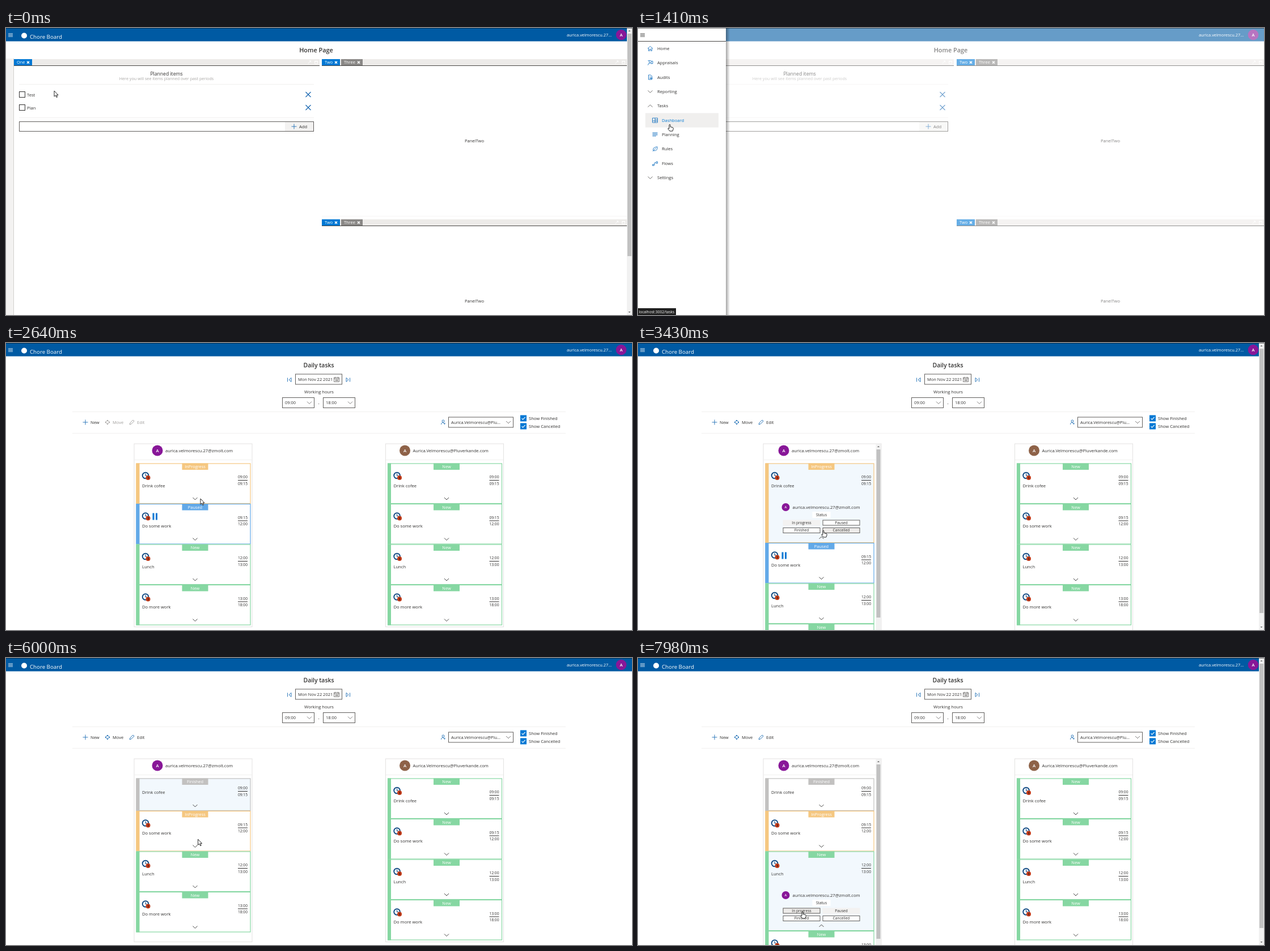
Recreate the animation shown at these times as an HTML page with a canvas. Size 1104x507 px, loop 8000 ms.

```html
<!DOCTYPE html>
<html lang="en">
<head>
<meta charset="utf-8">
<title>Daily tasks</title>
<style>
html, body { margin: 0; width: 100%; height: 100%; overflow: hidden; background: #fff; }
canvas { display: block; }
</style>
</head>
<body>
<canvas id="stage" width="1104" height="507"></canvas>
<script>
const W = 1104, H = 507, LOOP = 8000;
const g = document.getElementById('stage').getContext('2d');
const INK = '#323130', BLUE = '#0078d4', FAINT = '#f1f0ef', PURPLE = '#881798';
const USER = 'aurica.velmorescu.27', MAIL = USER + '@zmolt.com';
const WORK_MAIL = 'Aurica.Velmorescu@Pluverkande.com';
const STATUS_COLOR = { New: '#86d7a2', InProgress: '#f5c780', Paused: '#62a9e8', Finished: '#c2c1c0' };
const TASKS = [
  ['Drink cofee', '09:00', '09:15'],
  ['Do some work', '09:15', '12:00'],
  ['Lunch', '12:00', '13:00'],
  ['Do more work', '13:00', '18:00']
];
const ICONS = {
  home: 'M-4.5 0L0-4L4.5 0M-3-1V4H-1V1H1V4H3V-1',
  people: 'M-4 4Q-3.500 0 0 0Q2 0 3 2M-2-2a2 2 0 1 0 4 0a2 2 0 1 0-4 0M-4-4H-1M2-3H4.500V1H2',
  doc: 'M-3-4H1L3-2V4H-3ZM-1-1H1M-1 1H4M-1 2.500H4',
  down: 'M-4-2L0 2L4-2',
  up: 'M-4 2L0-2L4 2',
  grid: 'M-4.500-4H4.500V4H-4.500ZM0-4V4M-4.500 1H0M0-1H4.500M0 1.500H4.500',
  lines: 'M-4.500-3.500H4.500M-4.500-1.500H4.500M-4.500.500H4.500M-4.500 2.500H2',
  leaf: 'M-4 4L2-2M-3 3Q-5-3 4-4Q5 4-3 3',
  flow: 'M-4.500 4V2H-2V4ZM-2 3H-1V-1H2M2-3H4.500V0H2Z',
  plus: 'M-4.500 0H4.500M0-4.500V4.500',
  cross: 'M-4.500-4.500L4.500 4.500M4.500-4.500L-4.500 4.500',
  tabCross: 'M-2-2L2 2M2-2L-2 2',
  move: 'M-1.500-2.500L0-4L1.500-2.500ZM-1.500 2.500L0 4L1.500 2.500ZM-2.500-1.500L-4-0L-2.500 1.500ZM2.500-1.500L4 0L2.500 1.500Z',
  edit: 'M-4 4L-3 1L2-4L4-2L-1 3Z',
  first: 'M-3.500-3.500V3.500M3-3.500L-1 0L3 3.500Z',
  last: 'M3.500-3.500V3.500M-3-3.500L1 0L-3 3.500Z',
  calendar: 'M-4.500-3.500H4.500V4H-4.500ZM-4.500-1.500H4.500M-2.500.500H3M-2.500 2H3M-2.500-4.500V-3M2.500-4.500V-3',
  person: 'M-3.500 4Q-3 0 0 0.500L3 4M-2-2a2 2 0 1 0 4 0a2 2 0 1 0-4 0M1 2H4',
  check: 'M-3 0L-1 2.200L3.300-2.200',
  burger: 'M-4-2.500H4M-4 0H4M-4 2.500H4',
  expand: 'M-2.500 2.500L2.500-2.500H0M2.500-2.500V0',
  maximize: 'M-2.500-2H2.500V2.500H-2.500ZM-2.500-1.500H2.500'
};
const ARROW = new Path2D('M0 0V10L2.400 8L4 11.500L5.600 10.900L4.100 7.400H7Z');
const HAND = new Path2D('M-1 1Q0-1 1 1V4.500L5 5.500Q6.500 6 6.300 8L5 12H0L-3.200 8Q-3-6-1 7.500Z'.replace('-3-6', '-3 6'));

// time, x, y of the pointer tip
const POINTER = [
  [0, 85, 111], [110, 85, 111], [640, 9, 10], [1060, 9, 10], [1270, 42, 140], [1410, 56, 170],
  [1550, 57, 186], [1690, 57, 186], [2080, 277, 258], [2150, 277, 258], [2570, 343, 275],
  [2640, 343, 275], [2790, 335, 273], [3280, 335, 273], [3430, 327, 331], [3500, 320, 331],
  [3700, 320, 331], [3800, 302, 331], [4600, 303, 331], [4720, 321, 303], [4980, 335, 268],
  [5200, 336, 268], [5390, 338, 317], [5620, 338, 317], [5800, 344, 306], [6210, 333, 335],
  [6390, 333, 335], [6820, 330, 401], [7240, 330, 401], [7960, 290, 448], [LOOP, 290, 448]
];
const HAND_SPANS = [[600, 1060], [1340, 1720], [3390, 4100], [7860, LOOP]];

const ramp = (t, from, to) => Math.min(1, Math.max(0, (t - from) / (to - from)));
const easeOut = p => 1 - (1 - p) ** 3;

function text(s, x, y, { size = 7.6, color = INK, align = 'left', weight = 400 } = {}) {
  g.font = `${weight} ${size}px "Open Sans", "Noto Sans", sans-serif`;
  g.textAlign = align;
  g.fillStyle = color;
  g.fillText(s, x, y + size * 0.36);
}
function rect(x, y, w, h, color) {
  g.fillStyle = color;
  g.fillRect(x, y, w, h);
}
function frame(x, y, w, h, color = '#605e5c', fill = '#fff', width = 1) {
  rect(x, y, w, h, fill);
  g.strokeStyle = color;
  g.lineWidth = width;
  g.strokeRect(x + 0.5, y + 0.5, w - 1, h - 1);
}
function icon(name, x, y, color = '#1f6fb5', width = 0.9) {
  g.save();
  g.translate(x, y);
  g.strokeStyle = color;
  g.lineWidth = width;
  g.stroke(new Path2D(ICONS[name]));
  g.restore();
}
function disc(x, y, r, color) {
  g.fillStyle = color;
  g.beginPath();
  g.arc(x, y, r, 0, 7);
  g.fill();
}
function avatar(x, y, r, color) {
  disc(x, y, r, color);
  text('A', x, y, { size: r * 0.82, color: '#fff', align: 'center', weight: 600 });
}
function scrollbar(x, top, bottom, thumbEnd, w = 9) {
  rect(x, top, w, bottom - top, '#f1f1f1');
  rect(x + 1, top + 10, w - 2, thumbEnd - top - 10, '#c1c1c1');
  const arrow = (y, d) => {
    g.fillStyle = '#606060';
    g.beginPath();
    g.moveTo(x + w / 2 - 2, y + d);
    g.lineTo(x + w / 2 + 2, y + d);
    g.lineTo(x + w / 2, y - d);
    g.fill();
  };
  arrow(top + 5, 1);
  arrow(bottom - 5, -1);
}

function header() {
  rect(0, 0, W, 23.5, '#005aa3');
  icon('burger', 8, 12.5, '#fff');
  disc(32, 13.5, 5, '#fff');
  text('Chore Board', 42, 16, { size: 9.7, color: '#fff' });
  text(USER + '...', 989, 12.5, { size: 7.4, color: '#fff' });
  avatar(1085, 12, 9.3, PURPLE);
}

function tab(label, x, y, w, color) {
  rect(x, y, w, 11, color);
  text(label, x + 5, y + 5.7, { size: 7.4, color: '#fff' });
  icon('tabCross', x + w - 7, y + 5.7, '#fff', 1.5);
}
function tabStrip(x, y, w) {
  rect(x, y, w, 11.5, '#edebe9');
  rect(x, y + 11, w, 1, '#484644');
  icon('expand', x + w - 18, y + 5.5, '#fff');
  icon('maximize', x + w - 6, y + 5.5, '#fff');
}
function home(w) {
  const mid = w / 2, leftEnd = Math.round(mid + 5), rightX = Math.floor(mid + 10), inner = leftEnd - 10;
  const center = (13 + leftEnd) / 2;
  text('Home Page', mid - 0.5, 39, { size: 10.9, align: 'center', weight: 600 });
  rect(0, 54, 13, H, '#f3f2f1');
  rect(13, 54, 1, H, '#d2d0ce');
  tabStrip(14, 55, leftEnd - 14);
  tab('One', 14, 55, 32, BLUE);
  text('Planned items', center, 81, { size: 8.6, align: 'center' });
  text('Here you will see items planned over past periods', center, 89.5, { size: 7.2, color: '#a9a7a5', align: 'center' });
  [99, 158].forEach(y => rect(23, y, inner - 23, 1, FAINT));
  ['Test', 'Plan'].forEach((name, i) => {
    const y = 117.5 + i * 23;
    frame(23, y - 5.5, 11, 11, '#323130');
    text(name, 37, y + 0.3);
    icon('cross', inner - 10, y, '#1262ae', 1.1);
  });
  frame(23, 165, inner - 23, 18);
  rect(inner - 51, 166, 50, 16, '#f3f2f1');
  icon('plus', inner - 35, 174);
  text('Add', inner - 26, 174);
  [55, 338].forEach(y => {
    tabStrip(rightX, y, w - rightX);
    tab('Two', rightX, y, 32, BLUE);
    tab('Three', rightX + 34, y, 38, '#8a8886');
    text('PanelTwo', (rightX + w) / 2, y + 144.5, { align: 'center' });
  });
  rect(rightX, 332, w - rightX, 1, '#f6f5f4');
  if (w < W) scrollbar(w, 0, H, 403);
}

function dropdown(label, x, y, w) {
  frame(x, y, w, 19);
  text(label, x + 5, y + 9.8, { size: 7.4 });
  icon('down', x + w - 9, y + 9.5, '#605e5c', 0.8);
}
function toolbar(dx, selected) {
  g.save();
  g.translate(dx, 0);
  text('Daily tasks', 551.5, 39, { size: 10.4, align: 'center', weight: 600 });
  icon('first', 500, 65);
  icon('last', 603, 65);
  frame(510, 54.500, 83, 19);
  text('Mon Nov 22 2021', 515, 64, { size: 7.5 });
  icon('calendar', 583, 64.5, '#605e5c', 0.8);
  text('Working hours', 552, 86.5, { align: 'center' });
  dropdown('09:00', 487, 96, 57);
  text('-', 551.5, 106, { align: 'center' });
  dropdown('18:00', 559, 96, 57);
  [121, 159].forEach(y => rect(117, y, 870, 1, FAINT));
  const ink = selected ? INK : '#a19f9d', tint = selected ? '#1f6fb5' : '#a19f9d';
  icon('plus', 140, 140);
  text('New', 149, 140);
  icon('move', 179, 140, tint);
  text('Move', 188, 140, { color: ink });
  icon('edit', 222, 140, tint);
  text('Edit', 231, 140, { color: ink });
  icon('person', 771, 140);
  dropdown('Aurica.Velmorescu@Plu...', 780, 130.5, 115);
  ['Finished', 'Cancelled'].forEach((name, i) => {
    const y = 133 + i * 14;
    rect(907, y - 5.5, 11, 11, BLUE);
    icon('check', 912.5, y, '#fff', 1.1);
    text('Show ' + name, 922, y);
  });
  g.restore();
}

function statusButton(label, x, y, { hover, disabled }) {
  if (disabled) rect(x - 33, y - 5, 66, 10, '#f3f2f1');
  else frame(x - 33, y - 5, 66, 10, '#605e5c', hover ? '#edebe9' : '#fff');
  text(label, x, y, { size: 6.6, align: 'center' });
}
function details(center, top, extra, disabled, hover) {
  g.save();
  g.beginPath();
  g.rect(center - 95, top + 57, 190, extra);
  g.clip();
  avatar(center - 63, top + 77.5, 7, PURPLE);
  text(MAIL, center - 51, top + 77.5);
  rect(center - 16, top + 85.5, 32, 11, '#fff');
  text('Status', center, top + 91, { size: 6.6, align: 'center' });
  ['In progress', 'Paused', 'Finished', 'Cancelled'].forEach((label, i) =>
    statusButton(label, center + (i % 2 ? 35 : -35), top + 105 + (i > 1 ? 13.5 : 0),
      { hover: label === hover, disabled: label === disabled }));
  g.restore();
}
const cardHeight = task => (task.status === 'Finished' ? 57.5 : 71.5) + task.extra;
function card(task, x, y, w) {
  const { name, start, end, status, extra = 0 } = task;
  const color = STATUS_COLOR[status], h = cardHeight(task), center = x + 3 + w / 2;
  const compact = status === 'Finished', shift = compact ? -7 : 0, right = x + w - 5.5;
  frame(x, y, w, h, color, task.selected ? '#f2f8fd' : '#fff', 1.2);
  rect(x, y, 6, h, color);
  rect(center - 23, y, 46, 11.5, color);
  text(status, center, y + 6, { size: 7.4, color: '#fff', align: 'center' });
  if (!compact) {
    disc(x + 16.500, y + 21.5, 6.3, '#174f87');
    disc(x + 16.500, y + 21.5, 4.3, '#fff');
    rect(x + 16, y + 18, 1, 4, '#174f87');
    rect(x + 16, y + 21, 3, 1, '#174f87');
    disc(x + 21, y + 25.5, 4, '#c23b1a');
    rect(x + 20.500, y + 23.500, 1.500, 4, '#5b2011');
  }
  if (status === 'Paused') [29, 34.5].forEach(dx => rect(x + dx, y + 16.5, 3, 12, BLUE));
  text(name, x + 10.5, y + (compact ? 25 : 39.5));
  text(start, right, y + 24.5 + shift, { size: 6.7, align: 'right' });
  rect(right - 17, y + 29.5 + shift, 17, 1, INK);
  text(end, right, y + 35.8 + shift, { size: 6.7, align: 'right' });
  if (extra) details(center, y, extra, task.disabled, task.hover);
  icon(task.open ? 'up' : 'down', center, y + h - 9, INK, 0.9);
}
function column(x, bottom, tint, mail, avatarX, tasks, cardWidth) {
  frame(x, 177.500, 209, bottom - 177.5, '#e3e2e1');
  avatar(avatarX, 190, 9.5, tint);
  text(mail, avatarX + 14, 190);
  rect(x + 1, 206, 207, 1, FAINT);
  let y = 212.5;
  for (const task of tasks) {
    card(task, x + 4, y, cardWidth);
    y += cardHeight(task);
  }
}

function tasksAt(t) {
  const later = t >= 3930;
  const statuses = later ? ['Finished', 'InProgress', 'New', 'New'] : ['InProgress', 'Paused', 'New', 'New'];
  const growth = [ramp(t, 3160, 3400) - ramp(t, 4020, 4260), 0, ramp(t, 6965, 7245), 0];
  const selected = t < 3160 ? -1 : t < 6950 ? 0 : 2;
  return TASKS.map(([name, start, end], i) => ({
    name, start, end, status: statuses[i], extra: 69 * growth[i], selected: i === selected,
    open: i === 0 ? t >= 3160 && t < 4020 : i === 2 && t >= 6965,
    disabled: i === 0 ? 'In progress' : 'Paused',
    hover: t < 3380 ? '' : t < 3490 ? 'Cancelled' : t < 4300 ? 'Finished' : t > 7840 ? 'In progress' : ''
  }));
}
function planning(t) {
  const loaded = t >= 2150;
  const mine = loaded ? tasksAt(t) : [];
  const theirs = loaded ? TASKS.map(([name, start, end]) => ({ name, start, end, status: 'New', extra: 0 })) : [];
  const end = mine.reduce((y, task) => y + cardHeight(task), 212.5);
  const bottom = Math.min(525, Math.max(502, end + 3));
  const pageScroll = bottom > H, listScroll = end > 522;
  const dx = pageScroll ? -5 : 0;
  toolbar(dx, t >= 3160);
  column(225.5 + dx, bottom, PURPLE, MAIL, 267 + dx - (listScroll ? 5 : 0), mine, listScroll ? 192 : 202);
  if (listScroll) scrollbar(419.5, 178, 525, t < 5000 ? 485 : 496);
  column(669 + dx, Math.max(502, bottom), '#8e6248', WORK_MAIL, 703.5 + dx, theirs, 202);
  if (pageScroll) scrollbar(1095, 0, H, 477);
}

const MENU = [
  ['home', 'Home'], ['people', 'Appraisals'], ['doc', 'Audits'], ['down', 'Reporting'], ['up', 'Tasks'],
  ['grid', 'Dashboard', 1], ['lines', 'Planning', 1], ['leaf', 'Rules', 1], ['flow', 'Flows', 1], ['down', 'Settings']
];
function menu(shown, hovered) {
  rect(0, 0, W, H, `rgba(255,255,255,${0.4 * shown})`);
  g.save();
  g.translate(-160 * (1 - shown), 0);
  const shade = g.createLinearGradient(155, 0, 162, 0);
  shade.addColorStop(0, 'rgba(0,0,0,.35)');
  shade.addColorStop(1, 'rgba(0,0,0,0)');
  rect(155, 0, 7, H, shade);
  rect(0, 0, 155, H, '#fff');
  rect(0, 23, 155, 1, '#484644');
  icon('burger', 8, 12.5, INK);
  MENU.forEach(([glyph, label, sub = 0], i) => {
    const y = 36.3 + i * 25.35, active = label === hovered;
    if (active) rect(13, y - 12.7, 129, 25.3, '#f0efee');
    const chevron = glyph === 'down' || glyph === 'up';
    icon(glyph, sub ? 30 : 21.5, y, chevron ? '#605e5c' : '#1f76c2');
    text(label, sub ? 42 : 34, y, { color: active ? BLUE : INK });
  });
  g.restore();
}
function linkHint(url, w) {
  rect(0, 495, w, 12, '#202020');
  text(url, 1.5, 501.8, { size: 6.6, color: '#fff' });
}

function pointer(t) {
  const i = POINTER.findIndex(key => key[0] > t);
  const [t0, x0, y0] = POINTER[i - 1], [t1, x1, y1] = POINTER[i];
  const p = ramp(t, t0, t1);
  const shape = HAND_SPANS.some(([from, to]) => t >= from && t < to) ? HAND : ARROW;
  g.save();
  g.translate(x0 + (x1 - x0) * p, y0 + (y1 - y0) * p);
  g.fillStyle = '#fff';
  g.strokeStyle = '#111';
  g.lineWidth = 0.9;
  g.fill(shape);
  g.stroke(shape);
  g.restore();
}

function draw(t) {
  const onHome = t < 1690;
  const menuShown = easeOut(ramp(t, 790, 1070)) * (1 - ramp(t, 1690, 1960));
  rect(0, 0, W, H, '#fff');
  header();
  if (onHome) home(menuShown ? W : 1095);
  else planning(t);
  const hovered = t < 1340 || t > 1760 ? '' : t < 1480 ? 'Dashboard' : 'Planning';
  if (menuShown) menu(menuShown, hovered);
  rect(0, 0, W, 1, 'rgba(0,0,0,.45)');
  if (hovered === 'Dashboard') linkHint('localhost:3002/tasks', 67);
  else if (t >= 1480 && t < 2400) linkHint('localhost:3002/tasks/planning', 97);
  pointer(t);
}

function tick() {
  draw(performance.now() % LOOP);
  requestAnimationFrame(tick);
}
tick();
</script>
</body>
</html>
```
